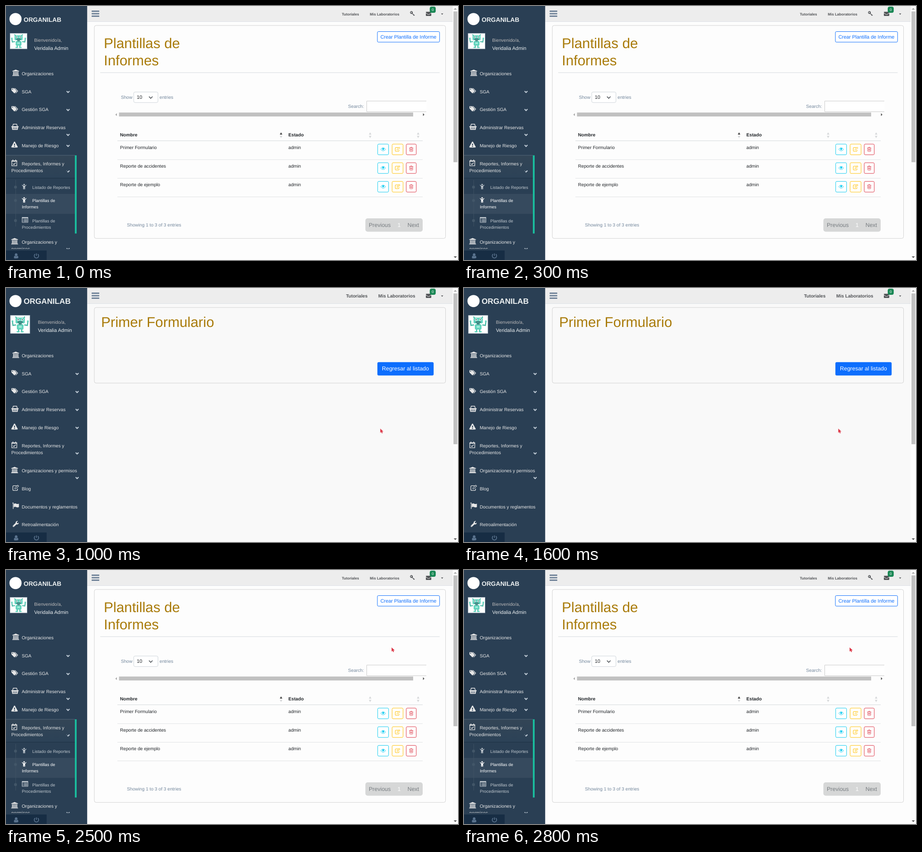
Animation of 998 by 561 pixels, one loop 3000 ms. Source, as an HTML page:

```html
<!DOCTYPE html>
<html lang="es">
<head>
<meta charset="utf-8">
<title>Plantillas de Informes</title>
<style>
html, body { margin: 0; width: 100%; height: 100%; overflow: hidden; background: #f9f9f9; }
svg { display: block; width: 998px; height: 561px; }
text { font-family: "Liberation Sans", Arial, sans-serif; text-rendering: geometricPrecision; white-space: pre; }
</style>
</head>
<body>
<svg id="stage" viewBox="0 0 998 561">
  <defs>
    <clipPath id="menuClip"><rect width="179.5" height="536.5"/></clipPath>
    <linearGradient id="activeFill" x2="0" y2="1">
      <stop stop-color="#334556"/><stop offset="1" stop-color="#2c4257"/>
    </linearGradient>
  </defs>
</svg>
<script>
const LOOP = 3000;
const S = 10.14, M = 10.92, L = 12.48, XL = 31.19, XS = 9.36;
const stage = document.getElementById('stage');

function add(parent, tag, attrs = {}, content) {
  const el = document.createElementNS('http://www.w3.org/2000/svg', tag);
  for (const k in attrs) el.setAttribute(k, attrs[k]);
  if (content !== undefined) el.textContent = content;
  parent.appendChild(el);
  return el;
}
const group = (p, attrs) => add(p, 'g', attrs);
const text = (p, x, y, s, size, fill, more = {}) =>
  add(p, 'text', { x, y, 'font-size': size, fill, ...more }, s);
const box = (p, x, y, x2, y2, fill, more = {}) =>
  add(p, 'rect', { x, y, width: x2 - x, height: y2 - y, fill, ...more });
const path = (p, d, fill, more = {}) => add(p, 'path', { d, fill, ...more });
const BOLD = { 'font-weight': 700 };

// Icons are centred on 0,0 and about 14 units wide: f = filled, s = stroked.
const ICONS = {
  bank: { f: 'M0-7L7.5-4V-3H-7.5V-4ZM-5.7-2.3h2v6h-2zM-2.6-2.3h2v6h-2zM.6-2.3h2v6h-2zM3.7-2.3h2v6h-2zM-6.6 4h13.2v1.2H-6.6zM-7.5 5.6h15v1.4h-15z' },
  tags: { f: 'M-7-5.2q0-.8.8-.8h4q.8 0 1.4.6L4.3-.2q.6.6 0 1.2L.2 5.2q-.6.6-1.2 0L-6.3-.2Q-7-.8-7-1.6ZM-5.5-3.6a1.1 1.1 0 1 0 2.2 0a1.1 1.1 0 1 0-2.2 0ZM-.6-6h1q.9 0 1.5.6L7.2-.2q.6.6 0 1.2L3.1 5.2q-.6.6-1.3-.1L5.6.9q.5-.5 0-1Z' },
  basket: { f: 'M-8-1.6h16v2H7L6 6.6H-6L-7 .4h-1ZM-4.4 1l.4 4h1.1l-.3-4zM-1.5 1v4h1V1zM.7 1v4h1V1zM3.4 1L3 5h1.1l.4-4z', s: 'M-5.2-1.5L-3.7-6H3.7L5.2-1.5', w: 1.4 },
  warning: { f: 'M-.9-7q.9-.8 1.8 0L7.3 4.8Q7.6 6-.0 6Q-7.6 6-7.3 4.8ZM-1.1-2.9l.3 4.3h1.6l.3-4.3zM-1 2.4v2h2v-2z' },
  calendar: { f: 'M-6-5.2H6v2.4H-6zM-4-7h2v3h-2zM2-7h2v3H2z', s: 'M-5.5-4.8h11V6.3h-11ZM-2.8 1.6L-.8 3.6L3-.6', w: 1.3 },
  edit: { f: 'M-2.5 2.4V-.1L4.4-6.8L7.2-4L.2 2.4ZM-1.7.2v1.4h1.4L5.8-4L4.4-5.4Z', s: 'M2.2-5H-4.4Q-6.4-5-6.4-3V3.6Q-6.4 5.6-4.4 5.6H2Q4 5.6 4 3.6V1.5', w: 1.3 },
  flag: { f: 'M-7-5.8a1.2 1.2 0 1 1 2 0V6.5h-1.3V-5ZM-4.4-4.4Q-1.5-6.7 1.2-5Q3.8-3.5 7-5.2V2.3Q4 4 1.3 2.5Q-1.5 1-4.4 3Z' },
  wrench: { f: 'M-6.2 3.6L-.3-2.2Q-.6-5 1.8-6.2Q3.6-7 5.2-6.2L2.6-4.4V-2.5L4.2-1.5L6.7-3Q6.9-.2 4.4.9Q3 1.4 1.7.9L-4 6.4Q-5 7-6 6.2Q-7.2 5-6.2 3.6ZM-5.2 4.6a.6.6 0 1 0 1.2 0a.6.6 0 1 0-1.2 0Z' },
  user: { f: 'M-3.2-3a3.2 3.2 0 1 1 6.4 0a3.2 3.2 0 1 1-6.4 0M-5.3 3.9Q-5.3-.4-2.6-.2Q0 1.6 2.6-.2Q5.3-.4 5.3 3.9Q5.3 6-3 6Q-5.3 6-5.3 3.9' },
  power: { s: 'M0-6V-.4M-3.2-4.3A5.2 5.2 0 1 0 3.2-4.3', w: 1.8 },
  child: { f: 'M-1.9-5a1.9 1.9 0 1 1 3.8 0a1.9 1.9 0 1 1-3.8 0M-4.8-4.6L-2-2.2H2L4.8-4.6L5.6-3.7L2.4-.4V6.5H.4V2.6H-.4V6.5H-2.4V-.4L-5.6-3.7Z' },
  list: { f: 'M-7-6H7v2.6H-7zM-5.2-2h1.4v1.3h-1.4zM-5.2.4h1.4v1.3h-1.4zM-5.2 2.8h1.4v1.3h-1.4zM-2.6-2h8v1.3h-8zM-2.6.4h8v1.3h-8zM-2.6 2.8h8v1.3h-8z', s: 'M-6.5-5.5h13v11h-13Z', w: 1 },
  key: { f: 'M-6.5-3a3.7 3.7 0 1 1 6.6 2L6.4 4.2L5 5.6L3.8 4.5L2.8 5.5L1.7 4.4L2.6 3.4L-1.2.3A3.7 3.7 0 0 1-6.5-3M-4.7-3.3a1.5 1.5 0 1 0 3 0a1.5 1.5 0 1 0-3 0Z' },
  mail: { f: 'M-7-4.2Q-7-5.4-5.7-5.4H5.7Q7-5.4 7-4.2Q7-3 5.6-2L1.2 1Q0 1.7-1.2 1L-5.6-2Q-7-3-7-4.2M-7-1.6L-1.6 2Q0 3 1.6 2L7-1.6V4Q7 5.4 5.7 5.4H-5.7Q-7 5.4-7 4Z' },
  eye: { f: 'M-2.9-1.1a2.9 2.9 0 1 1 5.8 0a2.9 2.9 0 1 1-5.8 0M-1.7-1.2h.7Q-1-2.4.2-2.6v-.7Q-1.7-3-1.7-1.2Z', s: 'M-6.6 0Q-3.8-4.4 0-4.4T6.6 0Q3.8 4.4 0 4.4T-6.6 0Z', w: 1.1 },
  trash: { f: 'M-5.5-4.6h11v1.1h-11z', s: 'M-2-4.4L-1.4-6h2.8L2-4.4M-4.2-3.6V4.4Q-4.2 5.9-3 5.9H3Q4.2 5.9 4.2 4.4V-3.6M-1.9-1.5V3.6M0-1.5V3.6M1.9-1.5V3.6', w: 1 },
  chevron: { s: 'M-3.2-1.6L0 1.6L3.2-1.6', w: 2.1 }
};
function icon(p, name, x, y, fill = '#e7e7e7', scale = 1) {
  const { f, s, w } = ICONS[name];
  const g = group(p, { transform: `translate(${x} ${y}) scale(${scale})` });
  if (f) path(g, f, fill, { 'fill-rule': 'evenodd' });
  if (s) path(g, s, 'none', { stroke: fill, 'stroke-width': w });
}
const tri = (p, x, y, w, h, fill) => path(p, `M${x - w / 2} ${y}h${w}l${-w / 2} ${h}z`, fill);

function robot(p, x, y, w, h) {
  box(p, x, y, x + w, y + h, '#fff', { stroke: '#9fb0bd', 'stroke-width': .8 });
  const g = group(p, { transform: `translate(${x + w / 2} ${y + h / 2}) scale(${w / 38} ${h / 35})` });
  const teal = '#5fd3bc', dark = '#2b5d63';
  path(g, 'M-7-12L-9-15M7-12L9-15M-8 1L-14 2L-15-5M8 1L14 2L15-5M-3 9V14M3 9V14', 'none', { stroke: '#45b9a5', 'stroke-width': 2.2 });
  box(g, -9, -13, 9, -2, teal, { rx: 2 });
  box(g, -6.5, 0, 6.5, 10, teal, { rx: 2 });
  box(g, -3, -2, 3, 0, dark);
  for (const s of [-1, 1]) {
    add(g, 'circle', { cx: 4 * s, cy: -9, r: 2.3, fill: '#fff' });
    add(g, 'circle', { cx: 4 * s, cy: -9, r: 1.2, fill: dark });
    add(g, 'circle', { cx: 15 * s, cy: -6, r: 1.8, fill: teal });
    box(g, 4 * s - 3, 13, 4 * s + 3, 15.5, teal, { rx: 1 });
  }
  box(g, -5, -5.5, 5, -3.5, dark);
  box(g, -3, 3, 3, 6.5, '#a5ecdc');
}

function brand(p, size, x, avatar) {
  text(p, 39, 35.3, 'ORGANILAB', size, '#ecf0f1', BOLD);
  robot(p, ...avatar);
  text(p, x, 79, 'Bienvenido/a,', S, '#bab8b8');
  text(p, x, 97, 'Veridalia Admin', M, '#ecf0f1');
}

function item(p, name, ix, y, label, chevX, chevY) {
  icon(p, name, ix, y - 5.2);
  text(p, 34.7, y, label, S, '#e7e7e7');
  if (chevX) icon(p, 'chevron', chevX, chevY, '#c4cfda');
}

function menu(p, chevX, wrapY) {
  item(p, 'bank', 21.5, 152.8, 'Organizaciones');
  item(p, 'tags', 19, 192.6, 'SGA', chevX, 189.5);
  item(p, 'tags', 19, 232.4, 'Gestión SGA', chevX, 229.3);
  item(p, 'basket', 19.8, 272.2, 'Administrar Reservas', chevX, wrapY);
  item(p, 'warning', 18.8, 312, 'Manejo de Riesgo', chevX, 308.7);
  item(p, 'calendar', 18.3, 351.8, 'Reportes, Informes y', chevX, 365);
  text(p, 11.7, 367.4, 'Procedimientos', S, '#e7e7e7');
}

function card(p, bottom) {
  box(p, 195, 43, 970.5, bottom, 'none', { rx: 4, stroke: '#d2d2d2' });
}

function frameParts(p) {
  box(p, 0, 0, 179.5, 561, '#2a3f54');
  add(p, 'circle', { cx: 21, cy: 28.8, r: 13.4, fill: '#fff' });
  box(p, 179.5, 0, 986.5, 34.5, '#ededed');
  box(p, 179.5, 34.2, 986.5, 35, '#d9dee4');
  for (const y of [10, 15.5, 21]) box(p, 189, y, 206, y + 3.1, '#6f8298', { rx: .8 });
  icon(p, 'mail', 933, 17.4, '#515356', .85);
  box(p, 935.6, 1.5, 948.8, 15, '#198754', { rx: 4 });
  text(p, 942.2, 11.2, '0', 8, '#fff', { 'text-anchor': 'middle' });
  tri(p, 963, 16.6, 5, 2.6, '#515356');
  box(p, 986.5, 0, 998, 561, '#fbfbfb');
  tri(p, 992, 8, 7, -3.6, '#a3a3a3');
  tri(p, 992, 553, 7, 3.6, '#505050');
}

function footer(p) {
  box(p, 0, 540, 89.7, 561, '#172d44');
  icon(p, 'user', 22.4, 552, '#5a738e', .93);
  icon(p, 'power', 67.2, 552, '#5a738e', .93);
}

function subMenu(p) {
  box(p, 0, 415, 152, 459, '#fff', { opacity: .06 });
  path(p, 'M21.3 384V487', 'none', { stroke: '#425668', 'stroke-width': .9 });
  for (const y of [400, 429.5, 474]) add(p, 'circle', { cx: 21, cy: y, r: 3.2, fill: '#425668' });
  const dim = '#bfc7ce';
  icon(p, 'child', 40, 399, dim, .9);
  text(p, 58, 403.5, 'Listado de Reportes', XS, dim);
  icon(p, 'child', 40, 428.5, '#fff', .9);
  text(p, 58, 433.3, 'Plantillas de', XS, '#fff');
  text(p, 35, 447.3, 'Informes', XS, '#fff');
  icon(p, 'list', 42, 472.5, dim);
  text(p, 58, 477.7, 'Plantillas de', XS, dim);
  text(p, 35, 491.5, 'Procedimientos', XS, dim);
}

function actionButton(p, x, x2, y, color, name) {
  box(p, x, y, x2, y + 23.6, '#fff', { rx: 2.4, stroke: color });
  icon(p, name, (x + x2) / 2, y + 11.6, color, .8);
}

function listPage(p) {
  box(p, 179.5, 35, 986.5, 561, '#fdfdfd');
  brand(p, 13.72, 62.3, [9, 60.3, 37.5, 34.5]);
  const side = group(p, { 'clip-path': 'url(#menuClip)' });
  box(side, 0, 330, 152, 380, 'url(#activeFill)');
  box(side, 0, 329.3, 152, 330.2, '#566a7c');
  box(side, 0, 379.8, 152, 380.7, '#1d2f41');
  box(side, 152, 329.8, 156, 502.5, '#1abb9c');
  menu(side, 137, 284.3);
  icon(side, 'chevron', 132.8, 365, '#2f4458');
  subMenu(side);
  item(side, 'bank', 19, 524.8, 'Organizaciones y', 137, 536.5);
  text(side, 11.7, 540, 'permisos', S, '#e7e7e7');

  text(p, 741.5, 21, 'Tutoriales', 8.11, '#515356', BOLD);
  text(p, 803.2, 21, 'Mis Laboratorios', 8.11, '#515356', BOLD);
  icon(p, 'key', 897.5, 17, '#515356', .82);

  card(p, 513.3);
  text(p, 216, 93.3, 'Plantillas de', XL, '#a97b0a');
  text(p, 216, 130.8, 'Informes', XL, '#a97b0a');
  box(p, 820, 56.5, 957.3, 79.8, '#fff', { rx: 2.4, stroke: '#0d6efd' });
  text(p, 826.7, 72, 'Crear Plantilla de Informe', M, '#0d6efd');
  box(p, 208, 146.5, 957.5, 148, '#e2e5e8');

  const gray = '#73879c', ink = '#212529';
  text(p, 253.7, 205, 'Show', S, gray);
  box(p, 282, 190, 335.5, 213.2, '#fff', { rx: 3, stroke: '#ced4da' });
  text(p, 288.8, 205.4, '10', M, ink);
  path(p, 'M315.7 200l3.9 3.9l3.9-3.9', 'none', { stroke: '#343a40', 'stroke-width': 1.4 });
  text(p, 339, 205, 'entries', S, gray);
  text(p, 755.3, 225.3, 'Search:', S, gray);
  path(p, 'M928 210H796.5V233.5H928', '#fff', { stroke: '#c9c9c9' });
  box(p, 249.5, 235.3, 899, 244, '#c1c1c1');
  path(p, 'M244.7 236.7v6.4l-3.2-3.2z', '#a3a3a3');
  path(p, 'M920.7 236.7v6.4l3.2-3.2z', '#505050');

  text(p, 251.8, 287.8, 'Nombre', S, ink, BOLD);
  text(p, 623.6, 287.8, 'Estado', S, ink, BOLD);
  for (const [x, up] of [[607.3, '#444'], [804, '#d6d8da'], [910, '#d6d8da']]) {
    tri(p, x, 284, 5.6, -5, up);
    tri(p, x, 286.8, 5.6, 5, '#d6d8da');
  }
  box(p, 246, 297.2, 920, 298.2, '#d4d7da');
  ['Primer Formulario', 'Reporte de accidentes', 'Reporte de ejemplo'].forEach((name, i) => {
    const y = 41.2 * i;
    text(p, 251.8, 316 + y, name, S, ink);
    text(p, 623.6, 316 + y, 'admin', S, ink);
    actionButton(p, 820.7, 844.7, 305 + y, '#0dcaf0', 'eye');
    actionButton(p, 852.5, 876.7, 305 + y, '#ffc107', 'edit');
    actionButton(p, 883.7, 905.8, 305 + y, '#dc3545', 'trash');
    box(p, 246, 338.8 + y, 920, 339.7 + y, '#dcdfe2');
  });

  text(p, 267, 487, 'Showing 1 to 3 of 3 entries', S, gray);
  box(p, 793.5, 469, 920, 498.5, '#d6d7d7', { rx: 5 });
  text(p, 801, 488, 'Previous', L, '#777c80');
  text(p, 864.5, 488, '1', L, '#fff');
  text(p, 886.4, 488, 'Next', L, '#777c80');
}

function formPage(p) {
  box(p, 179.5, 35, 986.5, 561, '#f9f9f9');
  brand(p, 17.15, 70.4, [9.8, 60.3, 43, 40]);
  menu(p, 157, 268.8);
  item(p, 'bank', 19, 407.2, 'Organizaciones y permisos', 157, 419.3);
  item(p, 'edit', 21.5, 446.8, 'Blog');
  item(p, 'flag', 21.5, 486.6, 'Documentos y reglamentos');
  item(p, 'wrench', 21.5, 526.4, 'Retroalimentación');

  text(p, 750.7, 21.2, 'Tutoriales', S, '#515356', BOLD);
  text(p, 822, 21.2, 'Mis Laboratorios', S, '#515356', BOLD);
  card(p, 210);
  text(p, 210, 85.8, 'Primer Formulario', XL, '#a97b0a');
  const button = box(p, 820, 163.7, 944.2, 193.2, '#0d6efd', { rx: 3 });
  text(p, 830, 182.4, 'Regresar al listado', L, '#fff');
  return button;
}

// Each table row is [time in ms, value held from then on].
function hold(el, prop, rows) {
  const frames = rows.map(([t, v]) => ({ offset: t / LOOP, [prop]: v, easing: 'steps(1, end)' }));
  frames.push({ offset: 1, [prop]: rows[rows.length - 1][1] });
  el.animate(frames, { duration: LOOP, iterations: Infinity });
}

frameParts(stage);
const list = group(stage), form = group(stage);
listPage(list);
const button = formPage(form);
footer(stage);
const thumb = box(stage, 988, 12, 996.5, 345, '#c1c1c1');
const cursor = group(stage);
path(cursor, 'M.4 0V9.2L2.5 7.3L4 10.4L5.7 9.6L4.3 6.6H7.3Z', '#dc3545');

hold(list, 'opacity', [[0, 1], [1000, 0], [2500, 1]]);
hold(form, 'opacity', [[0, 0], [1000, 1], [2500, 0]]);
hold(button, 'fill', [[0, '#0d6efd'], [2000, '#0b5ed7'], [2500, '#0d6efd']]);
hold(thumb, 'height', [[0, '333px'], [2000, '330px'], [2500, '333px']]);
hold(cursor, 'opacity', [[0, 0], [500, 1]]);
hold(cursor, 'transform', [[0, 'translate(826px, 310.6px)'], [2000, 'translate(851px, 171px)']]);
</script>
</body>
</html>
```
